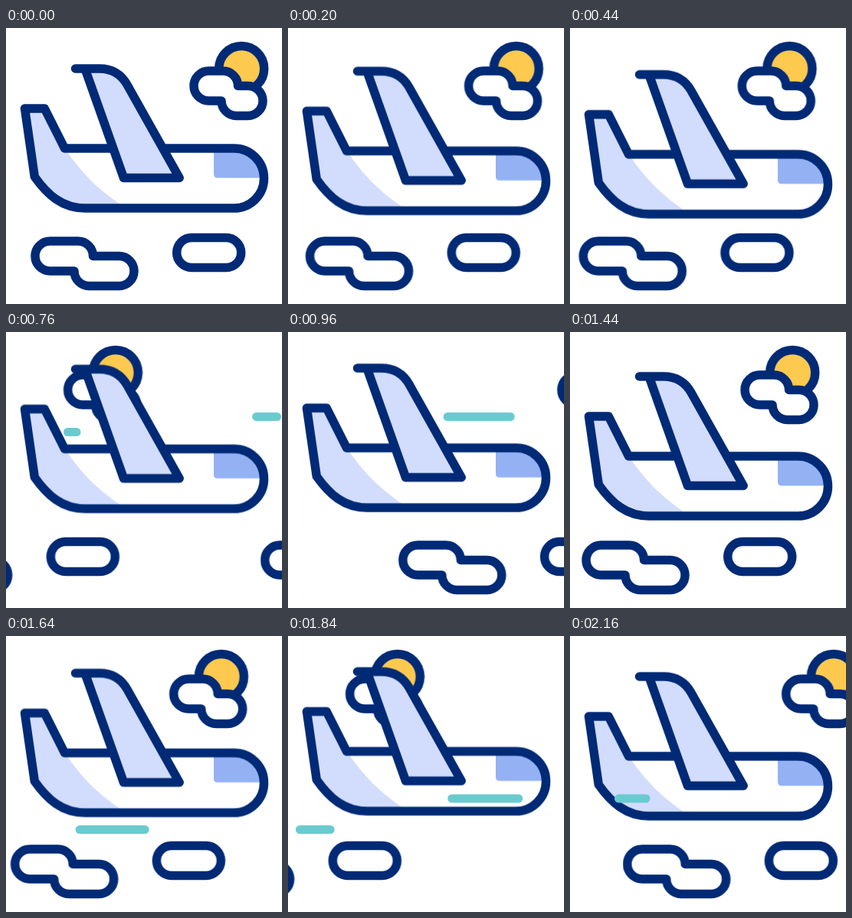
Animation of 360x360 px, one loop 2200 ms. Source, as an HTML page:

```html
<!DOCTYPE html>
<html lang="en">
<head>
<meta charset="utf-8">
<title>Flying plane</title>
<style>
html, body { margin: 0; width: 100%; height: 100%; overflow: hidden; background: #fff; }
svg { display: block; width: 100vw; height: 100vh; }

.ink { stroke: #012a76; stroke-width: 11.5; stroke-linecap: round; stroke-linejoin: round; }
.none { fill: none; }
.white { fill: #fff; }
.pale { fill: #d2dcfc; }
.glass { fill: #93b1f3; }
.sun { fill: #fdc94f; }

.sky, .plane, .streak { animation: 2200ms linear infinite; }
.sky.a { animation-name: sky-a; }
.sky.b { animation-name: sky-b; }
.plane { animation-name: bob; animation-timing-function: cubic-bezier(.333, 0, .667, 1); }

/* slow drift, quick exit to the left, quick entry from the right */
@keyframes sky-a {
  0% { transform: translateX(0); }
  28.05% { transform: translateX(-29px); }
  44.86% { transform: translateX(-377px); }
  83.54% { transform: translateX(-377px); }
  83.55% { transform: translateX(340px); }
  100% { transform: translateX(0); }
}
@keyframes sky-b {
  0%, 32.64% { transform: translateX(340px); }
  49.09% { transform: translateX(0); }
  77.14% { transform: translateX(-29px); }
  93.95%, 100% { transform: translateX(-377px); }
}
@keyframes bob {
  0%, 100% { transform: translateY(0); }
  20%, 60% { transform: translateY(7.7px); }
  40%, 80% { transform: translateY(-7.2px); }
}

/* one dash slides along each line, cut off at both ends */
.streak { stroke: #69cbd0; stroke-width: 11; stroke-linecap: round; fill: none; stroke-dasharray: 85 999; }
.s1 { animation-name: s1; }
.s2 { animation-name: s2; stroke-dasharray: 82 999; }
.s3 { animation-name: s3; }
.s4 { animation-name: s4; stroke-dasharray: 87 999; }
@keyframes s1 {
  0%, 20.95% { stroke-dashoffset: 87px; }
  35.6%, 100% { stroke-dashoffset: -117px; }
}
@keyframes s2 {
  0%, 32.45% { stroke-dashoffset: 83px; }
  61.45%, 100% { stroke-dashoffset: -295px; }
}
@keyframes s3 {
  0%, 66.59% { stroke-dashoffset: 87px; }
  86.73%, 100% { stroke-dashoffset: -192px; }
}
@keyframes s4 {
  0%, 74.86% { stroke-dashoffset: 88px; }
  100% { stroke-dashoffset: -260.5px; }
}
</style>
</head>
<body>
<svg viewBox="0 0 360 360">
  <defs>
    <g id="sky" class="ink">
      <circle class="sun" cx="307.2" cy="53" r="29.5"/>
      <path class="white" d="M264.5 56H283a19.5 19.5 0 0 1 19.5 19.5H315.5a19.5 19.5 0 0 1 0 39H300.5A19.5 19.5 0 0 1 281 95H264.5a19.5 19.5 0 0 1 0-39Z"/>
      <path class="white" d="M57.5 278H94A19.5 19.5 0 0 1 113.5 297.5H147.5a19.5 19.5 0 0 1 0 39H108.5A19.5 19.5 0 0 1 89 317H57.5a19.5 19.5 0 0 1 0-39Z"/>
      <rect class="white" x="222.7" y="273.5" width="84" height="39" rx="19.5"/>
    </g>
    <path id="hull" d="M24.5 105H50.3L76.5 157H297.5a39 39 0 0 1 0 78H103C73 235 54 217.5 37.3 194Z"/>
  </defs>

  <g class="sky a"><use href="#sky"/></g>
  <g class="sky b"><use href="#sky"/></g>

  <g class="plane">
    <use href="#hull" class="white"/>
    <path class="pale" d="M24.5 105H50.3L76.5 157C97 187 120 212 157 235H103C73 235 54 217.5 37.3 194Z"/>
    <path class="glass" d="M271 157H297.5A39 39 0 0 1 336.5 195.5H276q-5 0-5-5Z"/>
    <use href="#hull" class="ink none"/>
    <path class="pale" d="M103 53H122C138 53 150 60 158 74L226.2 195.5H153.5Z"/>
    <path class="ink none" d="M90.5 53H122C138 53 150 60 158 74L226.2 195.5H153.5L103 53"/>
  </g>

  <path class="streak s1" d="M195 130.5H80.5"/>
  <path class="streak s2" d="M353.5 110.5H60"/>
  <path class="streak s3" d="M205 252.5H15.5"/>
  <path class="streak s4" d="M335 212H63.5"/>
</svg>
</body>
</html>
```
